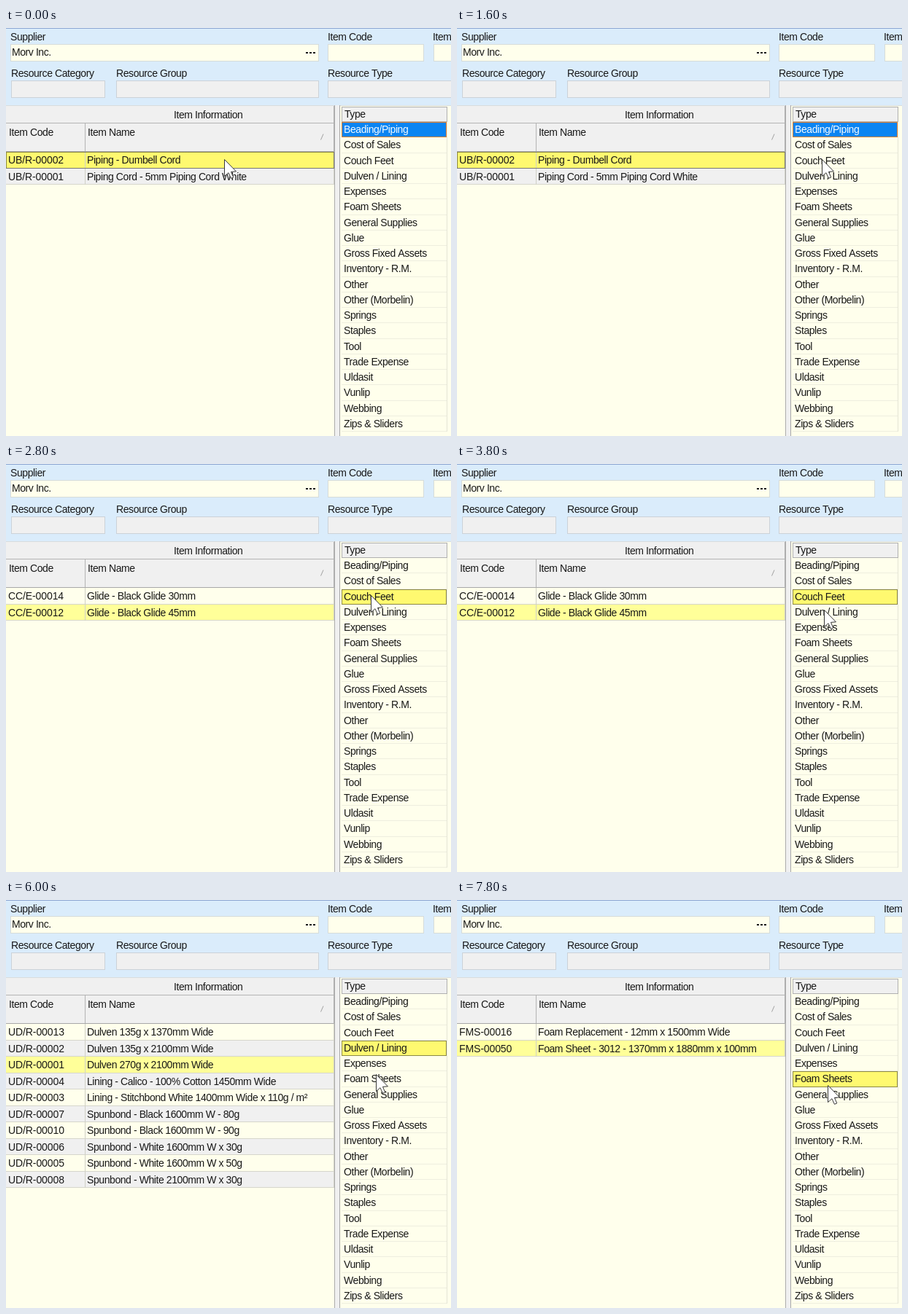
An HTML page with a canvas for the animation above (8000 ms loop, 610x560 px).

```html
<!DOCTYPE html>
<html lang="en">
<head>
<meta charset="utf-8">
<title>Item browser</title>
<style>
html, body { margin: 0; width: 100%; height: 100%; overflow: hidden; background: #ffffec; }
canvas { display: block; }
</style>
</head>
<body>
<canvas id="stage" width="610" height="560"></canvas>
<script>
const ctx = document.getElementById('stage').getContext('2d');
const LOOP = 8000;
const CREAM = '#ffffec', GREY = '#f0f0f0', YELLOW = '#fff970', INK = '#181818';

const types = ['Beading/Piping', 'Cost of Sales', 'Couch Feet', 'Dulven / Lining', 'Expenses',
  'Foam Sheets', 'General Supplies', 'Glue', 'Gross Fixed Assets', 'Inventory - R.M.', 'Other',
  'Other (Morbelin)', 'Springs', 'Staples', 'Tool', 'Trade Expense', 'Uldasit', 'Vunlip',
  'Webbing', 'Zips & Sliders'];

// Each view: start time, chosen type, chosen item, item rows
const views = [
  { at: 0, type: 0, item: 0, rows: [
    ['UB/R-00002', 'Piping - Dumbell Cord'],
    ['UB/R-00001', 'Piping Cord - 5mm Piping Cord White']] },
  { at: 1800, type: 2, item: 1, rows: [
    ['CC/E-00014', 'Glide - Black Glide 30mm'],
    ['CC/E-00012', 'Glide - Black Glide 45mm']] },
  { at: 4400, type: 3, item: 2, rows: [
    ['UD/R-00013', 'Dulven 135g x 1370mm Wide'],
    ['UD/R-00002', 'Dulven 135g x 2100mm Wide'],
    ['UD/R-00001', 'Dulven 270g x 2100mm Wide'],
    ['UD/R-00004', 'Lining - Calico - 100% Cotton 1450mm Wide'],
    ['UD/R-00003', 'Lining - Stitchbond White 1400mm Wide x 110g / m²'],
    ['UD/R-00007', 'Spunbond - Black 1600mm W - 80g'],
    ['UD/R-00010', 'Spunbond - Black 1600mm W - 90g'],
    ['UD/R-00006', 'Spunbond - White 1600mm W x 30g'],
    ['UD/R-00005', 'Spunbond - White 1600mm W x 50g'],
    ['UD/R-00008', 'Spunbond - White 2100mm W x 30g']] },
  { at: 6600, type: 5, item: 1, rows: [
    ['FMS-00016', 'Foam Replacement - 12mm x 1500mm Wide'],
    ['FMS-00050', 'Foam Sheet - 3012 - 1370mm x 1880mm x 100mm']] }
];

// Pointer positions: time, x, y
const moves = [
  [0, 299, 180], [200, 316, 181], [400, 310, 184], [600, 534, 169], [800, 538, 166],
  [1000, 529, 168], [1200, 518, 180], [1400, 496, 181], [1600, 500, 180],
  [3600, 502, 190], [3800, 503, 200], [5600, 503, 213], [5800, 504, 229],
  [6000, 507, 239], [6600, 507, 242], [7600, 508, 254]
];
const arrow = [[0, 0], [0, 17], [4, 13.4], [6.6, 19], [9, 18], [6.6, 12.4], [11.7, 12]];

function fill(x, y, w, h, color) {
  ctx.fillStyle = color;
  ctx.fillRect(x, y, w, h);
}

function frame(x, y, w, h, color, dash = []) {
  ctx.strokeStyle = color;
  ctx.lineWidth = 1;
  ctx.setLineDash(dash);
  ctx.strokeRect(x + 0.5, y + 0.5, w - 1, h - 1);
  ctx.setLineDash([]);
}

function box(x, y, w, h, color, edge) {
  fill(x, y, w, h, color);
  frame(x, y, w, h, edge);
}

function text(s, x, y, color = INK, spacing = -0.42) {
  ctx.font = '14px "Liberation Sans", Arial, sans-serif';
  ctx.letterSpacing = spacing + 'px';
  ctx.fillStyle = color;
  ctx.fillText(s, x, y);
}

function drawForm() {
  fill(0, 0, 610, 106, '#daecfb');
  fill(0, 0, 610, 1, '#8ea6d2');
  text('Supplier', 6, 17);
  text('Item Code', 441, 17);
  text('Item Name', 585, 17);
  text('Resource Category', 7, 67);
  text('Resource Group', 151, 67);
  text('Resource Type', 441, 67);
  const cream = '#d6dcda', grey = '#ccd2d8';
  box(6, 22, 423, 24, CREAM, cream);
  box(441, 22, 132, 24, CREAM, cream);
  box(586, 22, 40, 24, CREAM, cream);
  box(7, 72, 129, 24, GREY, grey);
  box(151, 72, 278, 24, GREY, grey);
  box(441, 72, 190, 24, GREY, grey);
  text('Morv Inc.', 8, 38);
  for (let i = 0; i < 3; i++) fill(411 + i * 5, 33, 3, 2, INK);
}

function drawItems(view) {
  fill(0, 106, 451, 454, CREAM);
  fill(0, 106, 450, 64, GREY);
  fill(0, 106, 450, 1, '#d8dcde');
  fill(0, 130, 450, 1, '#b4b4b4');
  fill(0, 169, 450, 1, '#a8a8a8');
  fill(108, 131, 1, 38, '#b4b4b4');
  fill(449, 107, 1, 63, '#b0b0b0');
  text('Item Information', 230, 124);
  text('Item Code', 4, 148);
  text('Item Name', 112, 148);
  ctx.strokeStyle = '#a0a0a0';
  ctx.lineWidth = 1;
  ctx.beginPath();
  ctx.moveTo(431.5, 153.5);
  ctx.lineTo(435, 145.5);
  ctx.stroke();

  view.rows.forEach(([code, name], i) => {
    const y = Math.round(170 + i * 22.5), h = Math.round(192.5 + i * 22.5) - y;
    const chosen = i === view.item, focus = chosen && view.type === 0;
    fill(0, y, 450, h, focus ? YELLOW : chosen ? '#ffff99' : i % 2 ? GREY : CREAM);
    fill(0, y + h - 1, 450, 1, '#d6d6cc');
    fill(108, y, 1, h, '#d0d0c6');
    fill(449, y, 1, h, '#d0d0c6');
    if (focus) frame(0, y, 450, h, INK, [1, 1]);
    text(code, 3, y + 16, INK, -0.1);
    text(name, 111, y + 16);
  });
}

function drawTypes(view) {
  fill(450, 106, 160, 454, CREAM);
  fill(451, 106, 7, 454, GREY);
  fill(450, 106, 1, 454, '#acacac');
  fill(457, 106, 1, 454, '#a8a8a8');
  fill(458, 106, 152, 1, '#d8dcde');
  box(460, 108, 145, 21, GREY, '#b0b0b0');
  text('Type', 464, 123);
  types.forEach((name, i) => {
    const y = Math.round(129 + i * 21.25), h = Math.round(150.25 + i * 21.25) - y;
    const chosen = i === view.type, blue = chosen && i === 0;
    if (chosen) fill(460, y, 144, h, blue ? '#0a84f2' : YELLOW);
    else fill(460, y + h - 1, 145, 1, '#eeeedf');
    if (chosen) frame(460, y, 144, h, blue ? '#e08030' : INK, blue ? [] : [1, 1]);
    text(name, 463, Math.round(144.2 + i * 21.25), blue ? '#f4faff' : INK);
  });
  fill(604, 129, 1, 425, '#e4e4d6');
}

function drawPointer(x, y) {
  ctx.beginPath();
  arrow.forEach(([px, py]) => ctx.lineTo(x + 0.5 + px * 1.36, y + 0.5 + py * 1.36));
  ctx.closePath();
  ctx.fillStyle = '#fff';
  ctx.fill();
  ctx.strokeStyle = '#383838';
  ctx.lineWidth = 1;
  ctx.stroke();
}

function draw(t) {
  const view = views.findLast(v => v.at <= t);
  const [, x, y] = moves.findLast(m => m[0] <= t);
  drawForm();
  drawItems(view);
  drawTypes(view);
  drawPointer(x, y);
}

const start = performance.now();
function tick() {
  draw((performance.now() - start) % LOOP);
  requestAnimationFrame(tick);
}
tick();
</script>
</body>
</html>
```
